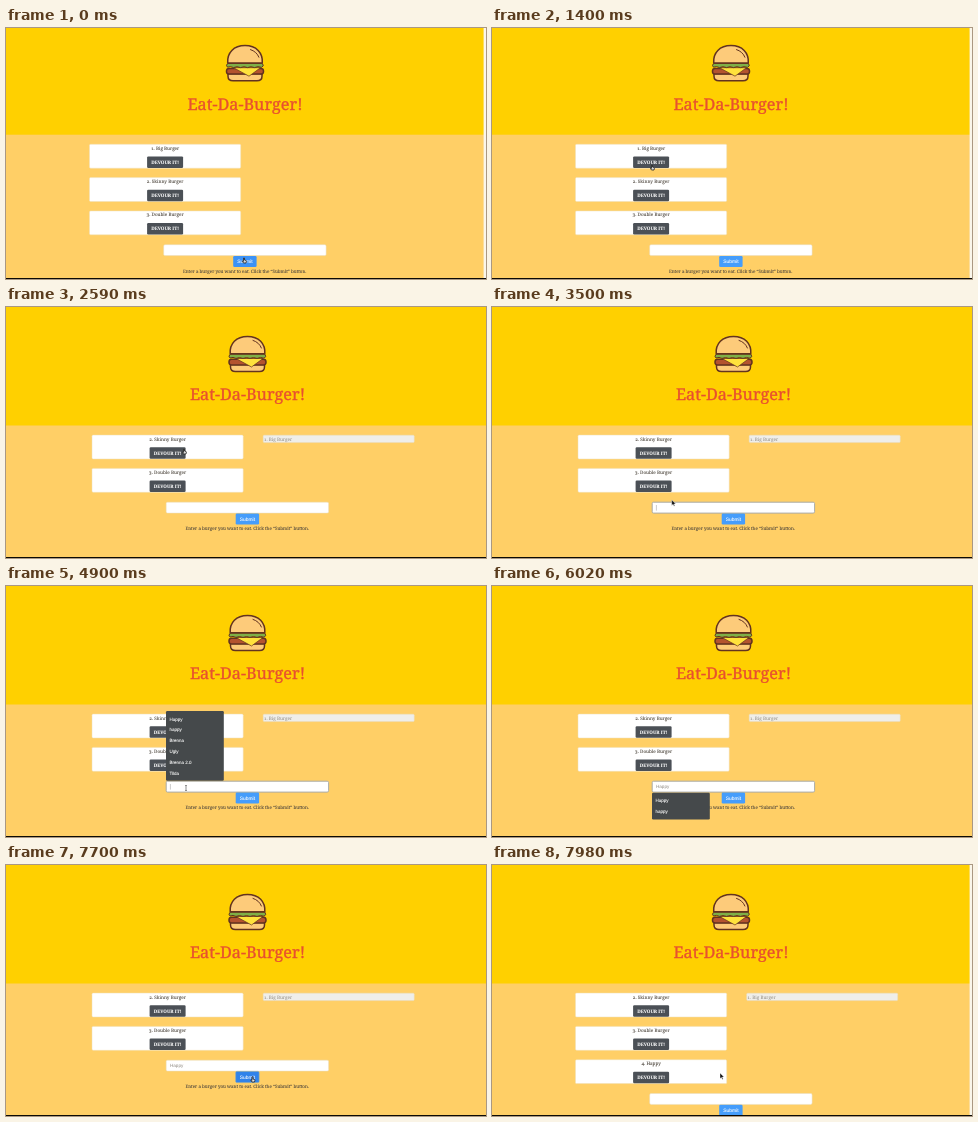
Write an HTML page that moves like this. It is 480 px wide and 251 px high and loops after 8 s.

```html
<!DOCTYPE html>
<html lang="en">
<head>
<meta charset="utf-8">
<title>Eat-Da-Burger!</title>
<style>
  html, body { margin: 0; width: 100%; height: 100%; overflow: hidden; background: #ffcf66; }
  svg { display: block; }
  text {
    font: 4.6px "Noto Serif", Georgia, serif; font-variant-numeric: oldstyle-nums;
    fill: #4d463d; stroke: #4d463d; stroke-width: .08; text-rendering: geometricPrecision;
  }
  .mid { text-anchor: middle; }
  .title { font-size: 16.25px; fill: #e8502f; stroke: #e8502f; stroke-width: .35; }
  .btn { font-weight: 700; }
  .white { fill: #fff; stroke: #fff; }
  .grey { fill: #8f8a82; stroke: none; }
  .sans { font-family: "Liberation Sans", Arial, sans-serif; font-variant-numeric: normal; }
  .outline { stroke: #63331f; stroke-width: 1.5; stroke-linejoin: round; }
</style>
</head>
<body>
<svg id="stage" width="480" height="251" viewBox="0 0 480 251">
  <rect width="480" height="251" fill="#ffcf66"/>
  <g id="page">
    <rect x="-5" width="490" height="118.5" fill="#ffd000"/>
    <g class="outline">
      <path d="M224.2 46.8C223.4 36.5 230.3 29.4 241.5 29.4S259.6 36.5 258.8 46.8Z" fill="#fdcb7a"/>
      <path d="M247 33.4Q253.2 35.4 255.4 41" fill="none" stroke-width="1" stroke-linecap="round"/>
      <path d="M224.5 57.5H258.5V60Q258.5 64.5 253.5 64.5H229.5Q224.5 64.5 224.5 60Z" fill="#fdcb7a"/>
      <rect x="223" y="52.3" width="37" height="5.6" rx="2.6" fill="#b4532f"/>
      <path d="M230 51.5H257L245.5 60Z" fill="#ffe23c" stroke-width=".7"/>
      <path d="M224 47.3H259Q261 50 258 51.2Q254.5 49.6 251 51.4Q247.5 49.6 244 51.4Q240.5 49.6 237 51.4Q233.5 49.6 230 51.4Q227 49.6 224 51Q222 49.4 224 47.3Z" fill="#7fb046" stroke-width="1"/>
    </g>
    <text class="title mid" x="241.5" y="93.4">Eat-Da-Burger!</text>
    <g id="cards"></g>
    <g id="eaten">
      <rect x="257.2" y="128.2" width="151" height="7.4" rx="1" fill="#efeeea" stroke="#e6dcc0" stroke-width=".5"/>
      <text class="grey" x="257.8" y="133.5">1. Big Burger</text>
    </g>
    <g id="form">
      <rect id="field" x="160.2" y="195.2" width="162.4" height="10.9" rx="1.4" fill="#fff"/>
      <text id="typed" class="sans grey" x="164" y="202.4"></text>
      <path id="caret" d="M164.4 198V203.6" stroke="#999" stroke-width=".5"/>
      <rect id="submit" x="229.7" y="206.4" width="23.4" height="11.2" rx="1.3"/>
      <text class="sans mid white" x="241.4" y="213.8" style="font-size:4.9px">Submit</text>
      <text class="mid" x="241.2" y="223.2" style="font-size:4.5px">Enter a burger you want to eat. Click the “Submit” button.</text>
    </g>
  </g>
  <g id="menu"></g>
  <rect id="scrollbar" x="477.6" width="2.4" height="251" fill="#faf6ea"/>
  <g id="cursor" stroke-linejoin="round">
    <path id="arrow" d="M0 0V5.6L1.4 4.4L2.3 6.4L3.2 6L2.3 4.1H4Z" fill="#111" stroke="#fff" stroke-width=".4"/>
    <path id="hand" d="M-.5 0Q0-.6.5 0V2L2 2.5Q2.5 2.7 2.4 3.4L2 5H-.5L-1.7 3.2Q-1.4 2.6-.5 3.4Z" fill="#ddd" stroke="#222" stroke-width=".8"/>
    <path id="beam" d="M-1-2.6Q0-2.6 0-2Q0-2.6 1-2.6M0-2V2M-1 2.6Q0 2.6 0 2Q0 2.6 1 2.6" fill="none" stroke="#444" stroke-width=".6"/>
  </g>
  <rect y="250" width="480" height="1" fill="#0c0a04"/>
</svg>
<script>
const LOOP = 8000, PITCH = 33.3;
const RELOAD = 2590, FOCUS = 3500, OPEN = 3780, TYPE = 5320, KEY = 140, CLOSE = 6790, PRESS = 7560, ADDED = 7840;
const burgers = ["1. Big Burger", "2. Skinny Burger", "3. Double Burger", "4. Happy"];
const hints = ["Happy", "happy", "Brenna", "Ugly", "Brenna 2.0", "Tilda"];
// time, x, y, shape
const moves = [
  [0, 238, 230, "hand"], [420, 238, 230, "hand"], [630, 222, 205, "arrow"],
  [1190, 160, 137, "hand"], [1750, 160, 137, "hand"], [2450, 178, 142, "hand"],
  [3290, 178, 142, "arrow"], [3570, 180, 202, "beam"], [5180, 180, 202, "none"],
  [6300, 180, 202, "beam"], [6580, 190, 205, "arrow"], [6790, 196, 208, "arrow"],
  [7420, 246.5, 212, "hand"], [7770, 246.5, 212, "hand"], [7840, 240, 211, "arrow"],
  [7980, 228, 208, "arrow"], [LOOP, 228, 208, "arrow"]
];

const $ = id => document.getElementById(id);
const show = (id, on) => $(id).setAttribute("visibility", on ? "visible" : "hidden");
const place = (id, x, y) => $(id).setAttribute("transform", `translate(${x} ${y})`);
const set = (id, attrs) => { for (const k in attrs) $(id).setAttribute(k, attrs[k]); };

const card = (label, i) => `<g transform="translate(0 ${i * PITCH})">
  <rect x="86" y="128.1" width="151.2" height="23.9" rx="1.2" fill="#fff" stroke="#efdfb6" stroke-width=".5"/>
  <text class="mid" x="161.6" y="133.5">${label}</text>
  <rect x="143.6" y="140.2" width="36" height="11.5" rx="1.2" fill="#4b5056"/>
  <text class="btn mid white" x="161.6" y="147.7">DEVOUR IT!</text></g>`;

const menu = (items, top) => `<rect x="160" y="${top}" width="57.8" height="${items.length * 10.8 + 5}" rx="1.2" fill="#45494b"/>` +
  items.map((s, i) => `<text class="sans white" x="163.4" y="${top + 9.5 + i * 10.8}" style="font-size:4.5px">${s}</text>`).join("");

const cache = {};
function fill(id, html) {
  if (cache[id] !== html) $(id).innerHTML = cache[id] = html;
}

function moveCursor(t) {
  let i = 0;
  while (i < moves.length - 2 && t >= moves[i + 1][0]) i++;
  const [t0, x0, y0, shape] = moves[i], [t1, x1, y1] = moves[i + 1];
  const p = (t - t0) / (t1 - t0), e = p * p * (3 - 2 * p);
  place("cursor", x0 + (x1 - x0) * e, y0 + (y1 - y0) * e);
  for (const s of ["arrow", "hand", "beam"]) show(s, s === shape);
}

function draw(t) {
  const before = t < RELOAD, after = t >= ADDED, long = before || after;
  place("page", long ? -2.5 : 0, before ? -11.8 : 0);
  place("form", 0, long ? PITCH : 0);
  show("scrollbar", long);
  show("eaten", !before);
  const list = before ? burgers.slice(0, 3) : burgers.slice(1, after ? 4 : 3);
  fill("cards", list.map(card).join(""));

  const focused = t >= FOCUS && t < PRESS;
  set("field", { stroke: focused ? "#a9aca9" : "#e6dcc0", "stroke-width": focused ? 1 : .5 });
  const keys = after ? 0 : Math.max(0, Math.min(5, Math.floor((t - TYPE) / KEY) + 1));
  $("typed").textContent = "Happy".slice(0, keys);
  show("caret", focused && !keys && (t - FOCUS) % 1000 < 500);

  const open = t >= OPEN && t < CLOSE;
  fill("menu", !open ? "" : keys ? menu(hints.slice(0, 2), 206.8) : menu(hints, 125));

  const pressed = t >= PRESS && !after;
  const hover = t < 500 || (t > 7300 && !after);
  set("submit", {
    fill: pressed ? "#2f83ea" : hover ? "#3c92f6" : "#459dfb",
    stroke: pressed ? "#7ba6c4" : "none", "stroke-width": .6
  });
  moveCursor(t);
}

const start = performance.now();
function tick() {
  draw((performance.now() - start) % LOOP);
  requestAnimationFrame(tick);
}
tick();
</script>
</body>
</html>
```
